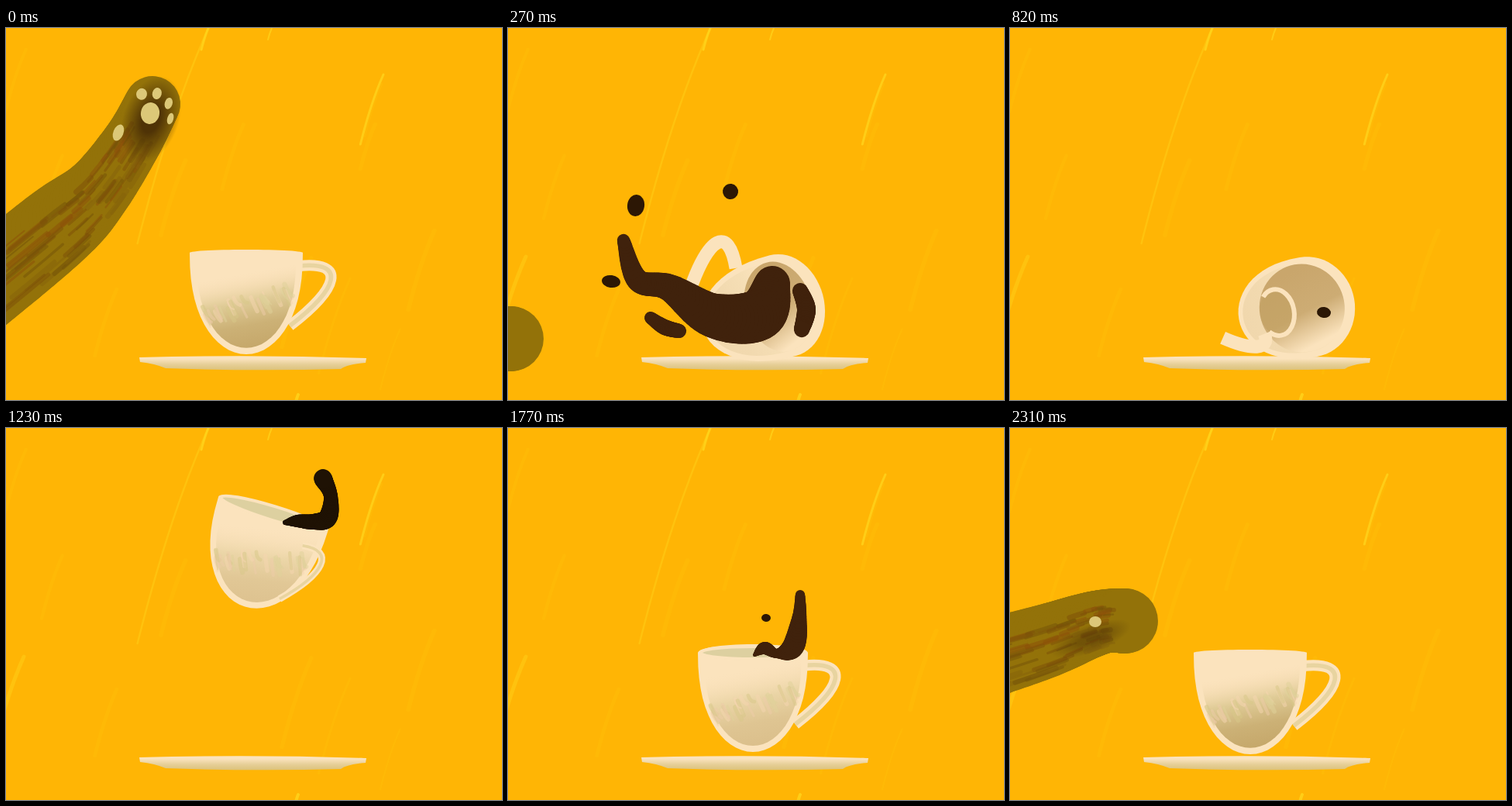
An HTML page that plays this animation: 640 px wide and 480 px high, repeating every 2370 ms.

```html
<!DOCTYPE html>
<html lang="en">
<head>
<meta charset="utf-8">
<title>Cat and coffee cup</title>
<style>
html, body { margin: 0; width: 100%; height: 100%; overflow: hidden; background: #ffb505; }
svg { display: block; width: 100vw; height: 100vh; }
</style>
</head>
<body>
<svg viewBox="0 0 640 480" xmlns="http://www.w3.org/2000/svg">
  <defs>
    <linearGradient id="shade" x1="0.4" y1="0" x2="0.6" y2="1">
      <stop offset="0.2" stop-color="#f8dcb4" stop-opacity="0"/>
      <stop offset="0.5" stop-color="#dfcb96"/>
      <stop offset="0.75" stop-color="#ccb176"/>
      <stop offset="1" stop-color="#c5a76a"/>
    </linearGradient>
    <linearGradient id="inside" x1="0" y1="0.65" x2="1" y2="0.35">
      <stop offset="0.1" stop-color="#c9a66c"/>
      <stop offset="0.55" stop-color="#cdac74"/>
      <stop offset="0.92" stop-color="#fbe3bd"/>
    </linearGradient>
    <linearGradient id="dish" x1="0" y1="0" x2="0" y2="1">
      <stop offset="0.2" stop-color="#fbe3bd"/>
      <stop offset="0.6" stop-color="#e6cf98"/>
      <stop offset="1" stop-color="#dcc27a"/>
    </linearGradient>
    <radialGradient id="dark">
      <stop offset="0.3" stop-color="#4f3306"/>
      <stop offset="1" stop-color="#4f3306" stop-opacity="0"/>
    </radialGradient>
  </defs>
  <rect width="640" height="480" fill="#ffb505"/>
  <g id="streaks" stroke="#ffd41c" stroke-linecap="round"></g>
  <path d="M172 425Q318 421 465 426L464 432Q440 434 432 440Q320 443 206 439Q192 433 173 431Z" fill="url(#dish)"/>
  <g id="scene"></g>
</svg>
<script>
const LOOP = 2370, COUNT = 35, STEP = 6.808;
const CREAM = '#fbe3bd', COFFEE = '#40220c', DROP = '#2c1705';
const lerp = (a, b, t) => a + (b - a) * t;
const fix = v => v.toFixed(1);
const between = (i, a, b) => i >= a && i <= b;
const range = (n, f) => Array.from({ length: n }, (_, k) => f(k));

function random(seed) {
  return () => {
    seed = (seed * 16807) % 2147483647;
    return seed / 2147483647;
  };
}

// Neighbouring keys [step, value] around step i, and the progress between them.
function span(keys, i) {
  let k = keys.length - 1;
  while (k > 0 && keys[k][0] > i) k--;
  const a = keys[k], b = keys[k + 1] || a;
  return [a[1], b[1], a === b ? 0 : Math.max(0, (i - a[0]) / (b[0] - a[0]))];
}

const oval = (x, y, rx, ry, fill, turn = 0, more = '') =>
  `<ellipse rx="${fix(rx)}" ry="${fix(ry)}" fill="${fill}" ` +
  `transform="translate(${fix(x)} ${fix(y)}) rotate(${turn})" ${more}/>`;

const stroke = (d, color, w, more = '') =>
  `<path d="${d}" fill="none" stroke="${color}" stroke-width="${fix(w)}" ${more}/>`;

// --- Tubes: a spine of [x, y, radius] points, used for arm and liquid ---

function along(spine, u) {
  const k = Math.max(0, Math.min(spine.length - 2, Math.floor(u))), t = u - k;
  const p = j => spine[Math.max(0, Math.min(spine.length - 1, j))];
  return [0, 1, 2].map(c => {
    const a = p(k - 1)[c], b = p(k)[c], d = p(k + 1)[c], e = p(k + 2)[c];
    return b + t * ((d - a) / 2 + t * (a - 2.5 * b + 2 * d - e / 2 + t * (1.5 * (b - d) + (e - a) / 2)));
  });
}

function tube(spine, color) {
  const per = 14, n = (spine.length - 1) * per;
  const pts = range(n + 1, k => along(spine, k / per));
  const parts = range(n, k => {
    const [x, y, r] = pts[k], [X, Y] = pts[k + 1];
    return `<path d="M${fix(x)} ${fix(y)}L${fix(X)} ${fix(Y)}" stroke-width="${fix(2 * r)}"/>`;
  });
  return `<g stroke="${color}" stroke-linecap="round">${parts.join('')}</g>`;
}

const shift = (spine, dx, dy) => spine.map(([x, y, r]) => [x + dx, y + dy, r]);
const shrink = (spine, x, y, k) => spine.map(p => [lerp(x, p[0], k), lerp(y, p[1], k), p[2] * k]);

function flow(keys, i) {
  const [a, b, t] = span(keys, i);
  return a.map((p, k) => p.map((v, c) => lerp(v, b[k][c], t)));
}

// --- Cup: x, y is the centre of the rim; side and slide place the handle ---

const upright = { x: 310, y: 290, half: 73, depth: 131, up: 4, turn: 0, mouth: 0, base: 0, side: 1, slide: 0, width: 14 };
const tipped = { ...upright, x: 355, y: 358, half: 67, depth: 108, up: 53, turn: 75, mouth: 43, side: -1, slide: 0.3, width: 17 };
const rolled = { ...tipped, x: 385, y: 360, half: 65, depth: 91, up: 60, turn: 80, mouth: 55, base: 0.45, side: 0.4, slide: 0.55 };
const flying = { ...upright, x: 345, y: 110, half: 74, depth: 126, up: 10, turn: 17, mouth: 9, side: 0.7, slide: 0.1, width: 9 };
const long = { ...upright, x: 308, y: 140, half: 69, depth: 274, up: 29, base: 0.83, side: 0.95, width: 12 };
const landed = { ...upright, x: 316, y: 290, half: 71, depth: 128, up: 11, mouth: 8 };

const cupKeys = [
  [0, upright], [1, upright], [2, { ...upright, x: 325, turn: 20 }], [4, tipped],
  [8, { ...rolled, turn: 92 }], [12, rolled], [13, { ...rolled, y: 368, half: 57 }],
  [15, { ...flying, y: 190, turn: 45 }], [18, flying], [19, { ...flying, y: 104, turn: 12 }],
  [22, long], [23, { ...upright, y: 312, half: 82, depth: 109 }],
  [24, { ...upright, y: 282, half: 70, depth: 139 }], [26, landed], [29, upright]
];

function fringe(c) {
  const rnd = random(77), hues = ['#dfd29a', '#f5d5b0', '#d8c888', '#edcba8'];
  return range(34, k => {
    const u = rnd(), x = c.half * (1.5 * u - 0.78);
    const y = c.depth * (0.52 - 0.22 * u + 0.1 * rnd());
    return stroke(`M${fix(x)} ${fix(y)}q3 8 8 ${fix(8 + 14 * rnd())}`, hues[k % 4], 2 + 4 * rnd(),
      'stroke-linecap="round" opacity=".5"');
  }).join('');
}

function cup(i) {
  const [a, b, t] = span(cupKeys, i), c = {};
  for (const key in a) c[key] = lerp(a[key], b[key], t);
  const open = c.mouth > 20;

  const shape = k => 'M' + range(60, j => {
    const q = j * Math.PI / 30, s = Math.sin(q);
    const y = s > 0 ? lerp(c.depth * 0.48, c.depth * s ** 0.87, k) : c.up * s * k + (1 - k) * c.depth * 0.48;
    return fix(c.half * Math.cos(q) * k) + ' ' + fix(y);
  }).join('L') + 'Z';

  const at = (u, v) => fix(c.half * c.side * u) + ' ' + fix(c.depth * (v + c.slide));
  const arm = `M${at(0.93, 0.13)}C${at(1.78, 0.08)} ${at(1.64, 0.35)} ${at(0.77, 0.72)}`;
  const handle = stroke(arm, CREAM, c.width) + (open ? '' : stroke(arm, '#e8d4a0', c.width * 0.4));

  let s = `<path d="${shape(1)}" fill="${CREAM}"/>` +
    `<path d="${shape(0.88)}" fill="url(#shade)" opacity="${open ? 0.2 : 1 - c.mouth / 20}"/>`;
  if (!open) s += fringe(c);
  if (c.mouth > 3) {
    s += open ? oval(0, c.mouth * 0.15, c.half - 8, c.mouth, 'url(#inside)')
      : oval(0, 0, c.half - 3, c.mouth, '#ddd0a0', 0, `stroke="${CREAM}" stroke-width="4"`);
  }
  if (c.base > 0.3) {
    const gap = open ? 'pathLength="100" stroke-dasharray="70 30" stroke-dashoffset="-40"' : '';
    s += oval(0, c.depth * c.base, open ? 30 : 25, open ? 22 : 34, '#c2a062', 0,
      `fill-opacity=".6" stroke="${CREAM}" stroke-width="6" ${gap}`);
  }
  return `<g transform="translate(${fix(c.x)} ${fix(c.y)}) rotate(${fix(c.turn)})">` +
    (c.side > 0.9 ? handle + s : s + handle) + '</g>';
}

// --- Coffee ---

const spill = [[341, 330, 23], [324, 370, 33], [265, 371, 28], [208, 335, 17], [167, 325, 14], [149, 274, 8]];
const hook = [[360, 122, 3], [376, 120, 8], [396, 121, 10], [415, 116, 12], [419, 88, 9], [409, 65, 12]];
const crest = [[336, 118, 16], [312, 118, 20], [285, 122, 24], [262, 120, 18], [259, 82, 14], [264, 49, 9]];
const spout = [[318, 293, 2], [331, 284, 8], [347, 291, 6], [368, 282, 14], [376, 244, 9], [377, 215, 6]];
const pool = shift(shrink(spout, 320, 300, 0.1), 0, 6);

const spillKeys = [[2, shrink(spill, 315, 320, 0.3)], [4, spill], [6, shift(spill, -110, -110)], [9, shift(spill, -340, -420)]];
const waveKeys = [[14, shift(hook, -10, -230)], [18, hook], [22, crest], [26, spout], [29, pool]];
const smear = [[184, 374, 8], [202, 386, 10], [221, 391, 9]];
const pocket = [[377, 339, 10], [385, 363, 12], [379, 389, 10]];

// step, x, y, rx, ry
const drops = [
  [4, 165, 229, 11, 14], [4, 287, 211, 10, 10], [4, 133, 327, 12, 8],
  [12, 405, 367, 9, 7], [22, 330, 36, 9.5, 13], [26, 333, 245, 6, 5]
];

function coffee(i) {
  let s = '';
  if (between(i, 2, 8)) s += tube(flow(spillKeys, i), COFFEE);
  if (between(i, 3, 8)) s += tube(shift(smear, (4 - i) * 40, (i - 4) * (i - 5) * 12), COFFEE);
  if (between(i, 4, 10)) s += tube(shrink(pocket, 405, 367, 1 - (i - 4) / 8), COFFEE);
  if (between(i, 14, 28)) s += tube(flow(waveKeys, i), i < 23 ? '#1f1204' : COFFEE);
  return s;
}

function spray(i) {
  return drops.map(([at, x, y, rx, ry]) => {
    const d = i - at, rise = at < 10;
    if (!between(d, -1, rise ? 4 : 1)) return '';
    return oval(x + d * (x - 330) / 10, y + d * (rise ? d - 30 : 12), rx, ry, DROP, 8);
  }).join('');
}

// --- Paw ---

const raised = [[-60, 360, 56], [60, 262, 54], [116, 212, 44], [162, 148, 38], [189, 98, 36]];
const reach = [[-140, 330, 55], [30, 280, 48], [95, 257, 43], [125, 249, 41], [149, 249, 42]];
const pawKeys = [
  [0, raised], [2, shift(reach, 75, 45)], [4, shift(reach, -145, 152)],
  [33, shift(reach, -95, 18)], [34, reach]
];

function hairs(spine) {
  const rnd = random(421), hues = ['#7d4e08', '#8c4f09', '#745208', '#86620b'];
  return range(90, k => {
    const u = 0.3 + rnd() * 2.7, v = -0.45 + 1.3 * rnd();
    const pts = [0, 0.2, 0.4].map(q => {
      const [x, y, r] = along(spine, u + q), [X, Y] = along(spine, u + q + 0.05);
      const len = Math.hypot(X - x, Y - y);
      return fix(x - (Y - y) / len * r * v) + ' ' + fix(y + (X - x) / len * r * v);
    });
    return stroke('M' + pts.join('L'), hues[k % 4], 2 + 5 * rnd(), 'stroke-linecap="round" opacity=".5"');
  }).join('');
}

function paw(i) {
  if (between(i, 5, 32)) return '';
  const spine = flow(pawKeys, i), [x, y] = spine[4], pad = '#dcc878';
  let s = tube(spine, '#937209') + hairs(spine);
  if (i < 2) {
    s += oval(x - 2, y + 20, 36, 58, 'url(#dark)', 20) + oval(x - 3, y + 12, 12, 14, pad, 10) +
      oval(x - 44, y + 37, 6.5, 11, pad, 22);
    s += range(4, k => {
      const q = (k * 43 - 114) * Math.PI / 180;
      return oval(x - 3 + 27 * Math.cos(q), y + 12 + 27 * Math.sin(q), 7 - k, 7.5, pad, 15);
    }).join('');
  } else if (i > 32) {
    s += oval(x - 45, y + 23, 55, 18, 'url(#dark)', -20, 'opacity=".5"') + oval(x - 39, y + 1, 8, 7, pad);
  }
  return s;
}

// --- Backdrop: a few bright scratches and many faint ones, all falling to the left ---

const scratch = (x, y, len, w, o) =>
  `<path d="M${fix(x)} ${fix(y)}q${fix(-len * 0.18)} ${fix(len * 0.4)} ${fix(-len * 0.33)} ${fix(len)}" ` +
  `fill="none" stroke-width="${fix(w)}" opacity="${fix(o)}"/>`;
const rnd = random(9);
document.getElementById('streaks').innerHTML =
  scratch(262, -2, 280, 2.5, 0.4) + scratch(262, -2, 30, 3, 0.8) + scratch(487, 60, 90, 3, 0.8) +
  scratch(343, 0, 15, 2, 0.7) + scratch(23, 295, 115, 5, 0.4) + scratch(377, 473, 8, 4, 0.8) +
  range(12, () => scratch(640 * rnd(), 400 * rnd(), 40 + 90 * rnd(), 2 + 4 * rnd(), 0.12)).join('');

const scene = document.getElementById('scene');
let shown = -1;

function render(ms) {
  const t = ms % LOOP;
  let i = COUNT - 1;
  while (i > 0 && Math.round(STEP * i) * 10 > t) i--;
  if (i === shown) return;
  shown = i;
  const behind = between(i, 19, 24);
  scene.innerHTML = (behind ? coffee(i) + cup(i) : cup(i) + coffee(i)) + spray(i) + paw(i);
}

function tick() {
  render(performance.now());
  requestAnimationFrame(tick);
}
tick();
</script>
</body>
</html>
```
